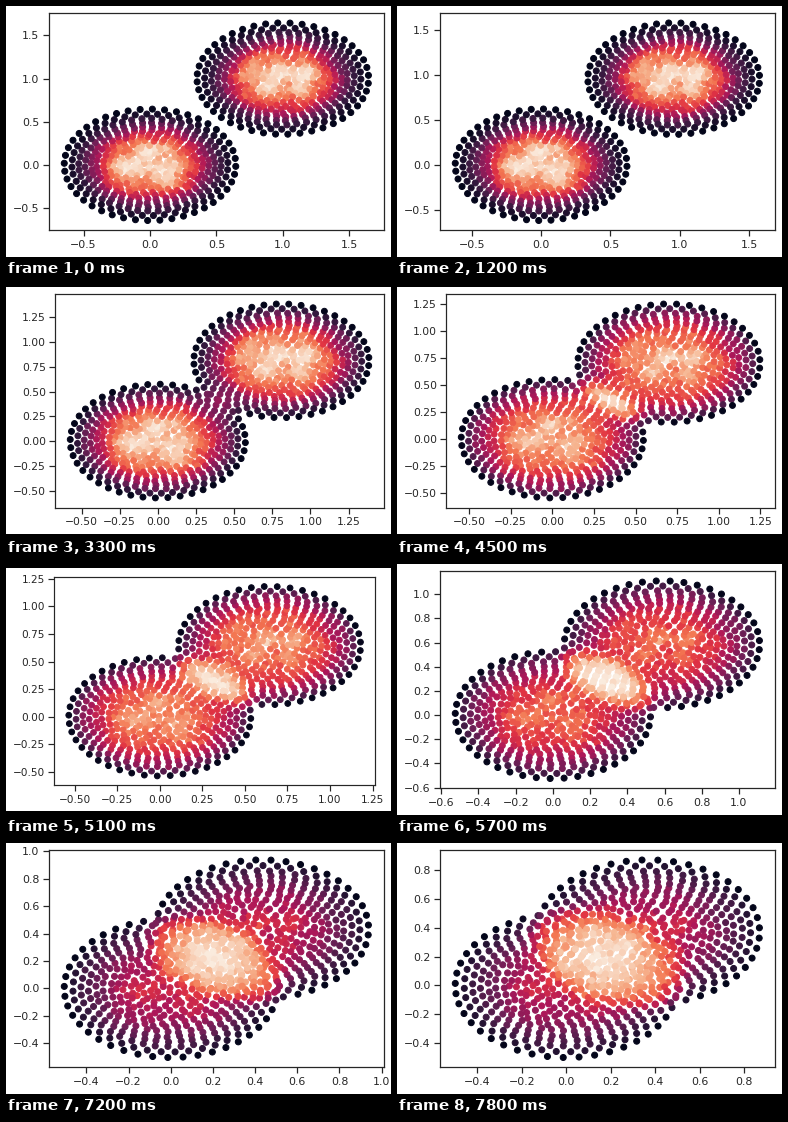
A matplotlib script for the animation above (8000 ms loop, 385 by 251 pixels).

```python
import numpy as np
import matplotlib.pyplot as plt
from matplotlib.animation import FuncAnimation
from matplotlib.colors import LinearSegmentedColormap
from matplotlib.patches import Rectangle

plt.rcParams["font.family"] = "DejaVu Sans"

WIDTH, HEIGHT, PAD = 385, 251, 7.2
AXES_BOX = np.array([43.0, 26.6, 334.8, 217.4])  # left, bottom, width, height in px
INK = "0.15"
ROCKET = LinearSegmentedColormap.from_list("rocket", [
    "#03051a", "#35193e", "#701f57", "#ad1759",
    "#e13342", "#f37651", "#f6b48f", "#faebdd"])

# Key values along the collision, by time step
STEPS = np.array([0, 7, 11, 15, 17, 21, 26])
OFFSET = [1, .905, .81, .70, .645, .525, .37]
RADIUS = [.646, .60, .574, .547, .535, .516, .50]
CONCENTRATION = [.70, .66, .62, .58, .58, .60, .60]
CORE_LEVEL = [.92, .92, .90, .80, .75, .56, .47]
CONTRAST = [1.9, 1.7, 1.4, 1.0, .9, 1.1, 1.2]

RINGS = np.array([1, 5, 9, 13, 17, 21, 25, 29, 32, 35, 38, 40, 42, 44, 44, 44])
COUNT = RINGS.sum()


def glide(step, values):
    """Smooth cubic path through the key values."""
    slopes = np.gradient(values, STEPS, edge_order=2)
    i = min(np.searchsorted(STEPS, step, side="right"), len(STEPS) - 1) - 1
    span = STEPS[i + 1] - STEPS[i]
    t = (step - STEPS[i]) / span
    ease = t * t * (3 - 2 * t)
    return (values[i] + (values[i + 1] - values[i]) * ease
            + span * t * (1 - t) * (slopes[i] * (1 - t) - slopes[i + 1] * t))


def make_drop(seed):
    """Mass fraction, angle and radial jitter of each particle."""
    rng = np.random.default_rng(seed)
    ring = np.repeat(np.arange(len(RINGS)), RINGS)
    mass = np.repeat((np.cumsum(RINGS) - RINGS / 2) / COUNT, RINGS)
    slot = np.concatenate([np.arange(n) for n in RINGS])
    loose = 1 - np.sqrt(mass / mass.max())
    wobble = rng.uniform(-.4, .4, COUNT) * loose
    angle = 2 * np.pi * (slot + ring % 2 / 2 + wobble) / RINGS[ring]
    return mass, angle + rng.random(), rng.uniform(-.035, .035, COUNT) * loose


DROPS = make_drop(4), make_drop(9)
GRAIN = np.random.default_rng(2).normal(0, .03, 2 * COUNT)


def drop_points(drop, r, a):
    mass, angle, jitter = drop
    u = np.sqrt((1 - np.sqrt(1 - 2 * a * mass * (1 - a / 2))) / a)
    u = u / u.max() + jitter
    return r * u[:, None] * np.column_stack([np.cos(angle), np.sin(angle)])


def density(points, h):
    delta = points[:, None] - points[None]
    return np.exp(-(delta ** 2).sum(-1) / h ** 2).sum(1)


def state(step):
    c, r, a, level, power = (
        glide(step, v)
        for v in (OFFSET, RADIUS, CONCENTRATION, CORE_LEVEL, CONTRAST))
    first, second = (drop_points(d, r, a) for d in DROPS)
    points = np.vstack([first, second + c])
    h = .13 * r
    rho = density(points, h)
    core = np.percentile(density(first, h), 90)
    x = (rho - rho.min()) / (core - rho.min())
    inner = level * np.minimum(x, 1) ** power
    excess = (1 - level) * np.maximum(x - 1, 0) / max(x.max() - 1, .05)
    value = inner + excess
    value += GRAIN * np.clip(1.6 * value, 0, 1)
    margin = .05 * (c + 2 * r)
    return points, np.clip(value, 0, 1), (-r - margin, c + r + margin)


fig = plt.figure(figsize=(WIDTH / 72, HEIGHT / 72), dpi=72, facecolor="black")
page = fig.add_artist(Rectangle((0, 0), 1, 1, color="white", lw=0, zorder=-5))
ax = fig.add_axes([0, 0, 1, 1])
dots = ax.scatter([], [], c=[], cmap=ROCKET, vmin=0, vmax=1)
ax.tick_params(color=INK, labelcolor=INK)
for spine in ax.spines.values():
    spine.set_color(INK)


def layout(box, scale):
    ax.set_position(box / [WIDTH, HEIGHT, WIDTH, HEIGHT])
    ax.tick_params(labelsize=11 * scale, length=6 * scale,
                   width=1.25 * scale, pad=3.5 * scale)
    for spine in ax.spines.values():
        spine.set_linewidth(1.25 * scale)
    dots.set_sizes([36 * scale ** 2])
    dots.set_linewidths([scale])


def update(i):
    points, value, limits = state(i // 3)
    dots.set_offsets(points)
    dots.set_array(value)
    ax.set_xlim(limits)
    ax.set_ylim(limits)
    layout(AXES_BOX, 1)
    page.set_bounds(0, 0, 1, 1)

    # Two-decimal labels make the plot wider: shrink it to fit, leaving black bars
    ticks = ax.get_xticks()
    if abs(ticks[1] - ticks[0] - .25) < .01:
        tight = ax.get_tightbbox()
        size = np.array([tight.width, tight.height]) + 2 * PAD
        scale = min(WIDTH / size[0], HEIGHT / size[1])
        origin = (np.array([WIDTH, HEIGHT]) - size * scale) / 2
        corner = (AXES_BOX[:2] - [tight.x0 - PAD, tight.y0 - PAD]) * scale + origin
        layout(np.concatenate([corner, AXES_BOX[2:] * scale]), scale)
        page.set_bounds(0, origin[1] / HEIGHT, 1, size[1] * scale / HEIGHT)
    return dots,


anim = FuncAnimation(fig, update, frames=80, interval=100, repeat=True,
                     repeat_delay=0, blit=False)
plt.show()
```
